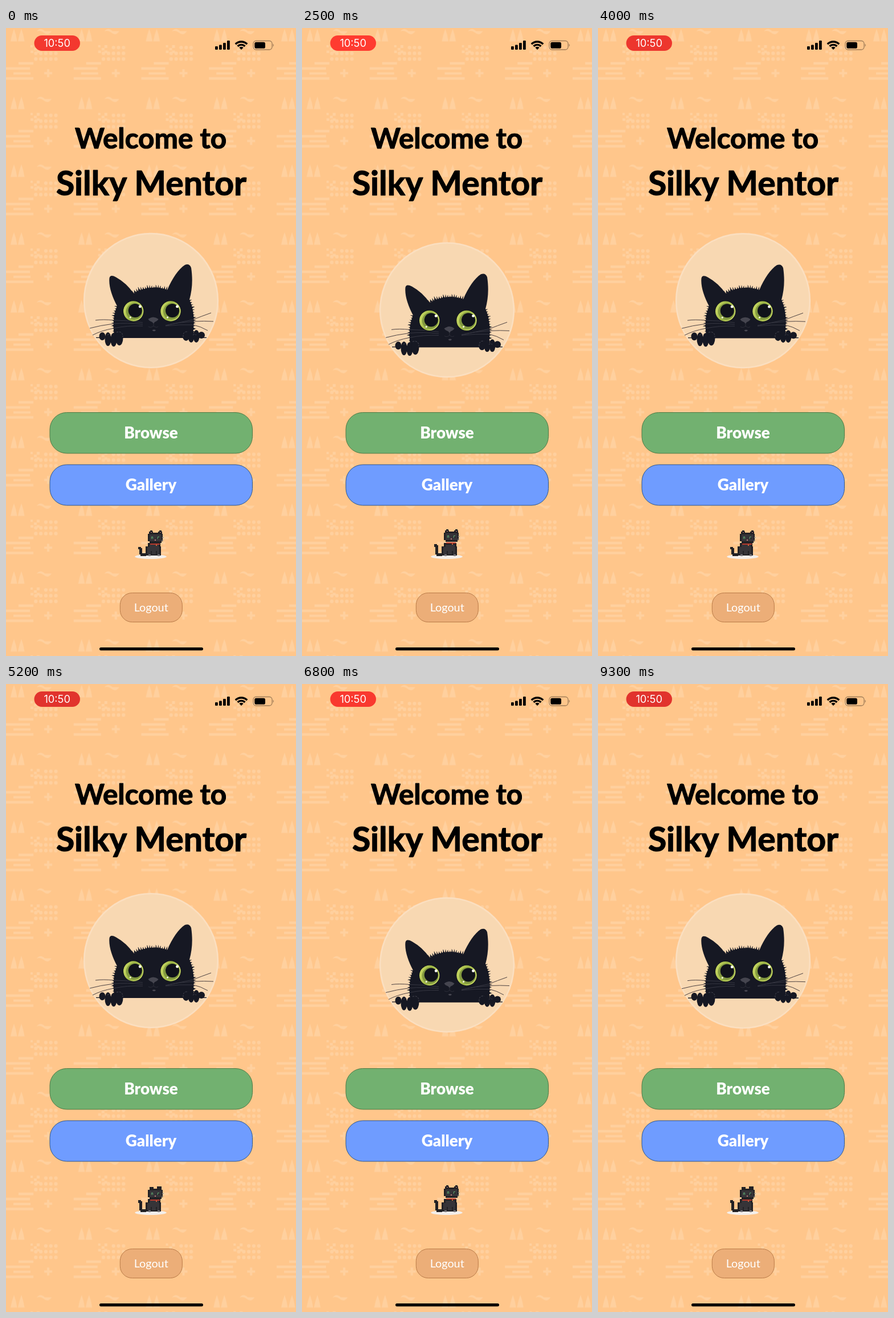
Animation of 509 by 1100 pixels, one loop 9400 ms. Source, as an HTML page:

```html
<!DOCTYPE html>
<html lang="en">
<head>
<meta charset="utf-8">
<title>Welcome screen</title>
<style>
  html, body { margin: 0; width: 100%; height: 100%; overflow: hidden; background: #ffc68b; }
  svg { display: block; width: 100vw; height: 100vh; }
  text { text-anchor: middle; font-family: Lato, sans-serif; }
  .title { font-weight: 700; stroke: #000; stroke-width: 1.2; stroke-linejoin: round; }
  .label { font-weight: 900; font-size: 27.8px; fill: #fff; }
</style>
</head>
<body>
<svg viewBox="0 0 509 1100">
  <defs>
    <pattern id="tile" width="118.75" height="118.75" patternUnits="userSpaceOnUse">
      <g fill="#ffd09e">
        <path d="M14 1.500Q18 12 19.500 23.500H8Q10 12 14 1.500ZM27 1.500Q31 12 32.500 23.500H21Q23 12 27 1.500Z"/>
        <path d="M54 6Q60-2 68 5.500H80Q74 15 66 8Q60 3 54 6Z"/>
        <path d="M54 30h5v5h-5zM49 35h5v4.500h-5zM43 39.500h5v4.500h-5zM54 39.500h5v4.500h-5zM43 30h4v4h-4z"/>
        <path d="M22 59.500H48V64H22ZM0 68.500H42V73H0ZM13 77.500H43V81.500H13ZM0 86H48V90.500H0Z"/>
        <path d="M67 77h5v-5h4v5h5v4h-5v5h-4v-5h-5z"/>
        <g id="dots"/>
      </g>
    </pattern>
    <linearGradient id="iris" x1="0" y1="0" x2="1" y2="0.300">
      <stop offset="0" stop-color="#d3e26a"/>
      <stop offset="0.550" stop-color="#9db545"/>
      <stop offset="1" stop-color="#cbdc66"/>
    </linearGradient>
    <g id="eye">
      <circle r="18.500" fill="#0d0f16"/>
      <circle r="17.700" fill="url(#iris)"/>
      <circle cx="1.500" cy="0.500" r="14.500" fill="#82993f"/>
      <circle cx="3" cy="-1" r="12" fill="#10121a"/>
      <circle cx="11.500" cy="-8" r="2.400" fill="#fff"/>
      <circle cx="-5.500" cy="11" r="1.600" fill="#f4f7dc"/>
    </g>
  </defs>

  <rect width="509" height="1100" fill="#ffc68b"/>
  <rect width="509" height="1100" fill="url(#tile)"/>

  <rect id="pill" x="49.500" y="13" width="80.500" height="27" rx="13.500"/>
  <text x="89.700" y="33" fill="#fff" style="font:400 18.3px Inter,sans-serif">10:50</text>
  <g id="bars"></g>
  <g fill="none" stroke="#000" stroke-width="3.400">
    <path d="M402.800 28.300A14.400 14.400 0 0 1 423.200 28.300M406.600 32A9 9 0 0 1 419.400 32"/>
    <path d="M413 38L409.300 34.300A5.300 5.300 0 0 1 416.700 34.300Z" fill="#000" stroke="none"/>
  </g>
  <rect x="434" y="22.500" width="33" height="15.500" rx="4.800" fill="none" stroke="#a07d58" stroke-width="1.300"/>
  <rect x="436.300" y="24.700" width="18.700" height="11" rx="2.800"/>
  <path d="M468.500 27.500Q471.300 30 468.500 33Z" fill="#a07d58"/>

  <text class="title" x="254" y="211" font-size="49.500">Welcome to</text>
  <text class="title" x="255" y="292.500" font-size="59">Silky Mentor</text>

  <g id="badge">
    <circle cx="254.500" cy="477.500" r="117.300" fill="#f8d8b2" stroke="#fbdfc0" stroke-width="2.600"/>
    <g fill="#161823">
      <path d="M158 541.700H352V543H158Z"/>
      <path d="M191 543C187 525 188 503 195 487C186 470 180 452 181.500 438Q183 431 193 436.500Q212 447 224 465Q254 448 283 459C292 438 303 422 314 415Q322 412 325 420C328 440 327 458 322 476Q334 502 327 543Z"/>
      <path id="fur"/>
      <g id="paws"></g>
    </g>
    <path d="M194 533Q205 530 205 541M311 541Q310 531 320 532M178 538q3-3 6 0M328 538q3-3 6 0" fill="none" stroke="#55555f" stroke-width="0.800" stroke-dasharray="3 2"/>
    <g fill="none" stroke-width="1">
      <path d="M190 512Q170 510 157 512M189 518Q165 521 147 526M189 526Q167 530 152 538M328 511Q343 505 360 499M330 514Q348 513 364 514M329 520Q342 523 354 530" stroke="#4c4141"/>
      <path d="M240 516Q215 512 190 512M240 519Q212 516 189 518M240 522Q212 521 189 526M280 521Q304 516 328 511M280 521Q304 515 330 514M280 522Q304 519 329 520" stroke="#363742"/>
    </g>
    <use href="#eye" x="223.700" y="496"/>
    <use href="#eye" x="289" y="496"/>
    <path d="M249.500 510Q259 503 267.500 510Q266 513 261 515L259 518L256.500 515Q251 513 249.500 510Z" fill="#45454f"/>
    <path d="M259 517V522Q254 526 250 523M259 522Q264 526 267 523" fill="none" stroke="#2d2e39"/>
    <path d="M256.500 529.500Q260 527 263 529.500Q260 533 256.500 529.500Z" fill="#494852"/>
  </g>

  <rect x="77" y="673.500" width="355.500" height="71.500" rx="29.500" fill="#72b170" stroke="#4c7a45"/>
  <rect x="77" y="764.900" width="355.500" height="71.200" rx="29.500" fill="#6f9cff" stroke="#2d568c"/>
  <rect x="200.300" y="989.500" width="109" height="51" rx="21" fill="#ecae78" stroke="#b97b48"/>
  <text class="label" x="254.500" y="718.500">Browse</text>
  <text class="label" x="254.500" y="809.500">Gallery</text>
  <text x="254.700" y="1021.500" font-size="19.800" fill="#fff">Logout</text>

  <ellipse cx="254" cy="926" rx="27.800" ry="4" fill="#f4efeb"/>
  <g id="kitten" shape-rendering="crispEdges"></g>

  <rect x="164" y="1085" width="182" height="5.200" rx="2.600"/>
</svg>

<script>
const LOOP = 9400, TAU = Math.PI * 2;
const $ = id => document.getElementById(id);

function add(parent, tag, attributes) {
  const node = document.createElementNS('http://www.w3.org/2000/svg', tag);
  for (const key in attributes) node.setAttribute(key, attributes[key]);
  return parent.appendChild(node);
}
const box = (parent, fill, x, y, width, height) => add(parent, 'rect', { fill, x, y, width, height });

// Three dots in the first row, five in the others
for (let row = 0; row < 3; row++)
  for (let col = row ? 0 : 2; col < 5; col++)
    add($('dots'), 'circle', { cx: 52.3 + col * 8.8, cy: 34.3 + row * 10, r: 3.1 });

[6, 8.5, 12, 16].forEach((height, i) =>
  add($('bars'), 'rect', { x: 367 + i * 7, y: 38 - height, width: 4.8, height, rx: 1.3 }));

for (const [cx, cy, rx, ry] of [
  [169, 540, 5.5, 7], [179, 545, 5.5, 12], [189, 546, 5.5, 12], [199, 543, 6.5, 13],
  [316, 538, 6.5, 10], [325, 540, 5.5, 11], [334, 540, 5.5, 11], [343, 538, 6, 6]
]) add($('paws'), 'ellipse', { cx, cy, rx, ry });

// Spikes pointing outwards along a quadratic curve
function fur([x0, y0], [cx, cy], [x1, y1], count, length) {
  let path = '';
  for (let i = 0; i < count; i++) {
    const t = (i + 0.5) / count, s = 1 - t;
    const x = s * s * x0 + 2 * s * t * cx + t * t * x1;
    const y = s * s * y0 + 2 * s * t * cy + t * t * y1;
    let dx = s * (cx - x0) + t * (x1 - cx), dy = s * (cy - y0) + t * (y1 - cy);
    const size = Math.hypot(dx, dy);
    dx /= size; dy /= size;
    const reach = length * (0.75 + 0.25 * Math.sin(i * 5.3)), lean = 2.5 * Math.sin(i * 2.1);
    path += `M${x - dx * 1.4 - dy * 2} ${y - dy * 1.4 + dx * 2}` +
            `L${x + dy * reach + dx * lean} ${y - dx * reach + dy * lean}` +
            `L${x + dx * 1.4 - dy * 2} ${y + dy * 1.4 + dx * 2}Z`;
  }
  return path;
}
$('fur').setAttribute('d',
  fur([221, 464], [254, 449], [285, 459], 26, 6) +
  fur([191, 537], [186, 508], [196, 486], 18, 5.5) +
  fur([322, 476], [332, 502], [328, 537], 20, 5.5));

const dark = '#222124', coat = '#363438', pink = '#bd7c79';
const part = () => add($('kitten'), 'g', {});

const tails = [[232, 909, 4], [231.500, 904, 5]].map(([x, y, hook]) => {
  const tail = part();
  box(tail, dark, x, y, 5, hook);
  box(tail, dark, 234, y + 2, 4.500, 920 - y);
  box(tail, dark, 236, 919.500, 10, 5);
  return tail;
});

const torso = part();
box(torso, dark, 249, 902, 22, 22);
box(torso, dark, 245, 908, 27, 16);
box(torso, coat, 248, 909, 21, 13);
box(torso, coat, 252, 905, 16, 8);
box(torso, dark, 254, 916, 1.500, 8);
box(torso, dark, 263, 916, 1.500, 8);
box(torso, '#77757a', 250, 922, 4, 2.500);
box(torso, '#77757a', 266, 922, 4, 2.500);

const head = part();
const ears = add(head, 'g', {});
for (const x of [251, 267]) {
  box(ears, dark, x, 882, 7, 5);
  box(ears, dark, x + 1.500, 880, 4, 3);
  box(ears, pink, x + 2.500, 883, 2, 3);
}
const flatEars = add(head, 'g', {});
box(flatEars, dark, 252, 881, 7, 5);
box(flatEars, dark, 265, 880, 8, 5);
box(head, dark, 248.500, 886, 26.500, 13);
box(head, dark, 252, 884, 21, 18);
box(head, coat, 252, 887, 21, 12);
for (const x of [254.500, 266]) {
  box(head, '#62a873', x, 891, 3, 4);
  box(head, dark, x + 1, 892, 1.500, 3);
}
box(head, pink, 261, 896, 2, 2);
box(head, '#99938d', 274, 892, 2.500, 1);
box(head, '#99938d', 273, 897, 2.500, 1);
box(head, '#b8392c', 253, 903, 17, 2);
box(head, '#d2683a', 263, 905, 2, 1.500);

const show = (node, visible) => node.setAttribute('visibility', visible ? 'inherit' : 'hidden');

function draw(t) {
  const bob = 8.2 + 8.8 * Math.sin(TAU * (t - 1240) / 4050);
  $('badge').setAttribute('transform', `translate(0 ${bob})`);

  const glow = 0.5 + 0.5 * Math.cos(TAU * (t - 390) / 2050);
  const mix = (from, to) => Math.round(from + (to - from) * glow);
  $('pill').setAttribute('fill', `rgb(${mix(217, 255)},${mix(49, 59)},${mix(44, 48)})`);

  // Idle cycle of the kitten: crouch, ears back, stretch
  const beat = t % 1000;
  const crouched = beat < 150 || beat >= 900;
  const stretched = beat >= 450 && beat < 900;
  head.setAttribute('transform', `translate(0 ${stretched ? -2 : 0})`);
  show(ears, crouched || stretched);
  show(flatEars, !crouched && !stretched);
  show(tails[0], crouched);
  show(tails[1], !crouched);
}

function tick() {
  draw(performance.now() % LOOP);
  requestAnimationFrame(tick);
}
tick();
</script>
</body>
</html>
```
